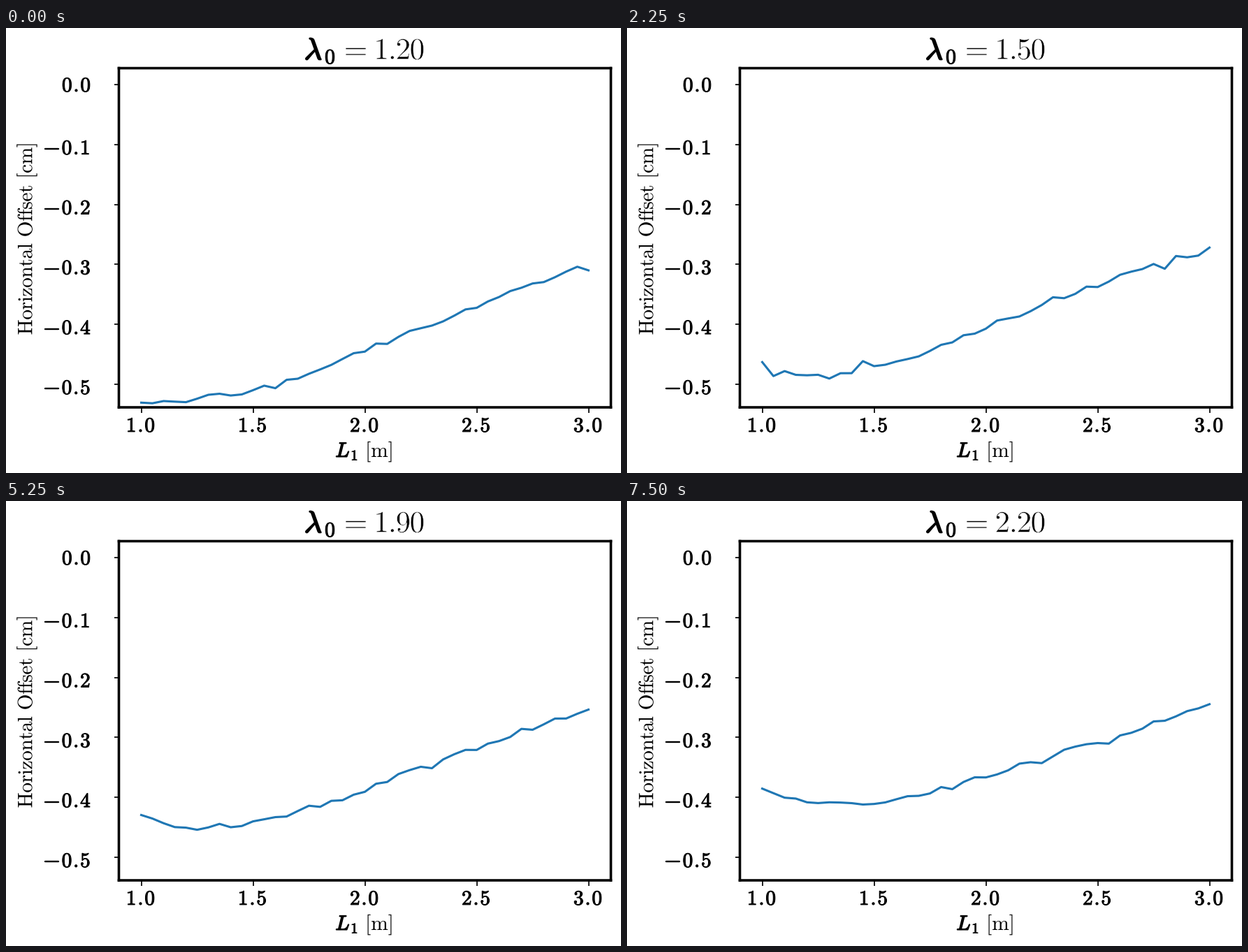
Animation of 880x637 px, one loop 8000 ms. Source, as a matplotlib script:

```python
import numpy as np
import matplotlib.pyplot as plt
from matplotlib.animation import FuncAnimation
from matplotlib.patches import PathPatch
from matplotlib.path import Path
from matplotlib.textpath import TextPath
from matplotlib.transforms import Affine2D

plt.rcParams["mathtext.fontset"] = "cm"

W, H, DPI = 880, 637, 100
PX = 72 / DPI                       # one pixel in points
TITLE, LABEL = 43.5, 29.5           # em sizes in pixels
X = np.linspace(1, 3, 41)

# Mean offset at a few lengths for a few wavelengths
KEY_X = [1.0, 1.15, 1.3, 1.5, 2.0, 2.5, 3.0]
KEY_LAM = [1.2, 1.4, 1.8, 2.2]
KEY_Y = np.array([[530, 532, 522, 506, 446, 368, 305],
                  [480, 488, 490, 476, 413, 340, 278],
                  [445, 463, 460, 455, 390, 317, 258],
                  [380, 405, 412, 406, 364, 308, 242]]) / -1000


def offset(step):
    """Smooth trend for one wavelength with measurement noise on top."""
    lam = 1.2 + step / 10
    keys = [np.interp(lam, KEY_LAM, col) for col in KEY_Y.T]
    trend = np.polyval(np.polyfit(KEY_X, keys, 4), X)
    return trend + np.random.default_rng(step).normal(0, 0.004, X.size)


fig = plt.figure(figsize=(W / DPI, H / DPI), dpi=DPI, facecolor="white")

ax = fig.add_axes([161.5 / W, 1 - 543 / H, 704 / W, 485.5 / H])
ax.set_xlim(0.9, 3.1)
ax.set_ylim(-462 / 858, 23.5 / 858)
ax.set_xticks(np.arange(1, 3.1, 0.5))
ax.set_yticks(-np.arange(6) / 10)
ax.tick_params(length=7.5 * PX, width=1.7 * PX,
               labelbottom=False, labelleft=False)
for spine in ax.spines.values():
    spine.set_linewidth(3.6 * PX)
    spine.set_snap(False)
line, = ax.plot(X, offset(0), color="#1f77b4", lw=3.1 * PX)

# Overlay in pixel coordinates for all lettering
stage = fig.add_axes([0, 0, 1, 1])
stage.set_xlim(0, W)
stage.set_ylim(H, 0)
stage.axis("off")


def glyphs(tex, size):
    return TextPath((0, 0), f"${tex}$", size=size)


def ink(path, edge=0, color="black"):
    """Fill a path; a black edge thickens the strokes, a white one thins."""
    return stage.add_patch(PathPatch(path, fc="black", ec=color,
                                     lw=edge * PX, joinstyle="round"))


def put(path, x, y, ha=0.5, turn=0, **style):
    box = path.get_extents()
    move = (Affine2D().translate(-box.x0 - ha * box.width, 0)
            .rotate_deg(turn).scale(1, -1).translate(x, y))
    return ink(move.transform_path(path), **style)


def number(text, x, y, size, font, digit, dot):
    """Figures centred in cells whose widths are given in em."""
    parts = []
    for c in text:
        cell = size * (dot if c == "." else digit)
        path = glyphs(rf"\{font}{{{c}}}", size)
        box = path.get_extents()
        move = (Affine2D().translate(x + cell / 2 - (box.x0 + box.x1) / 2, -y)
                .scale(1, -1))
        parts.append(move.transform_path(path))
        x += cell
    return Path.make_compound_path(*parts)


def tick_label(text, x, y):
    ink(number(text, x, y, LABEL, "mathbf", 0.575, 0.319), edge=1)


def title_value(step):
    return number(f"{1.2 + step / 10:.2f}", 527.3, 44.7, TITLE, "mathrm",
                  0.459, 0.255)


for k in range(5):
    tick_label(f"{1 + k / 2:.1f}", 170.8 + 160 * k, 578)

tick_label("0.0", 78.8, 91)
for k in range(1, 6):
    base = 81 + 85.8 * k + 14
    tick_label(f"{k / 10:.1f}", 78.5, base)
    stage.plot([56, 74.6], [base - 7.6] * 2, color="black", lw=2.4 * PX,
               solid_capstyle="round")

name = r"\hspace{-0.017}".join(
    r"\ \hspace{0.04}" if c == " " else c for c in "Horizontal Offset [cm]")
put(glyphs(rf"\mathrm{{{name}}}", LABEL), 37.3, 302.5, turn=90)

put(glyphs("L", LABEL), 472.5, 614, ha=0, edge=1.5)
put(glyphs(r"\mathbf{1}", 21), 498.5, 618.7, edge=0.8)
put(glyphs(r"\mathrm{[m]}", LABEL), 517.5, 614, ha=0)

put(glyphs(r"\lambda", TITLE), 429, 45, ha=0, edge=2)
put(glyphs(r"\mathbf{0}", 30), 463.5, 51, edge=1)
put(glyphs("=", TITLE), 500.5, 44.7, edge=0.4, color="white")
value = ink(title_value(0), edge=0.6, color="white")


def draw(i):
    step = i // 3
    line.set_ydata(offset(step))
    value.set_path(title_value(step))
    return line, value


anim = FuncAnimation(fig, draw, frames=32, interval=250, repeat=True,
                     repeat_delay=0)
plt.show()
```
